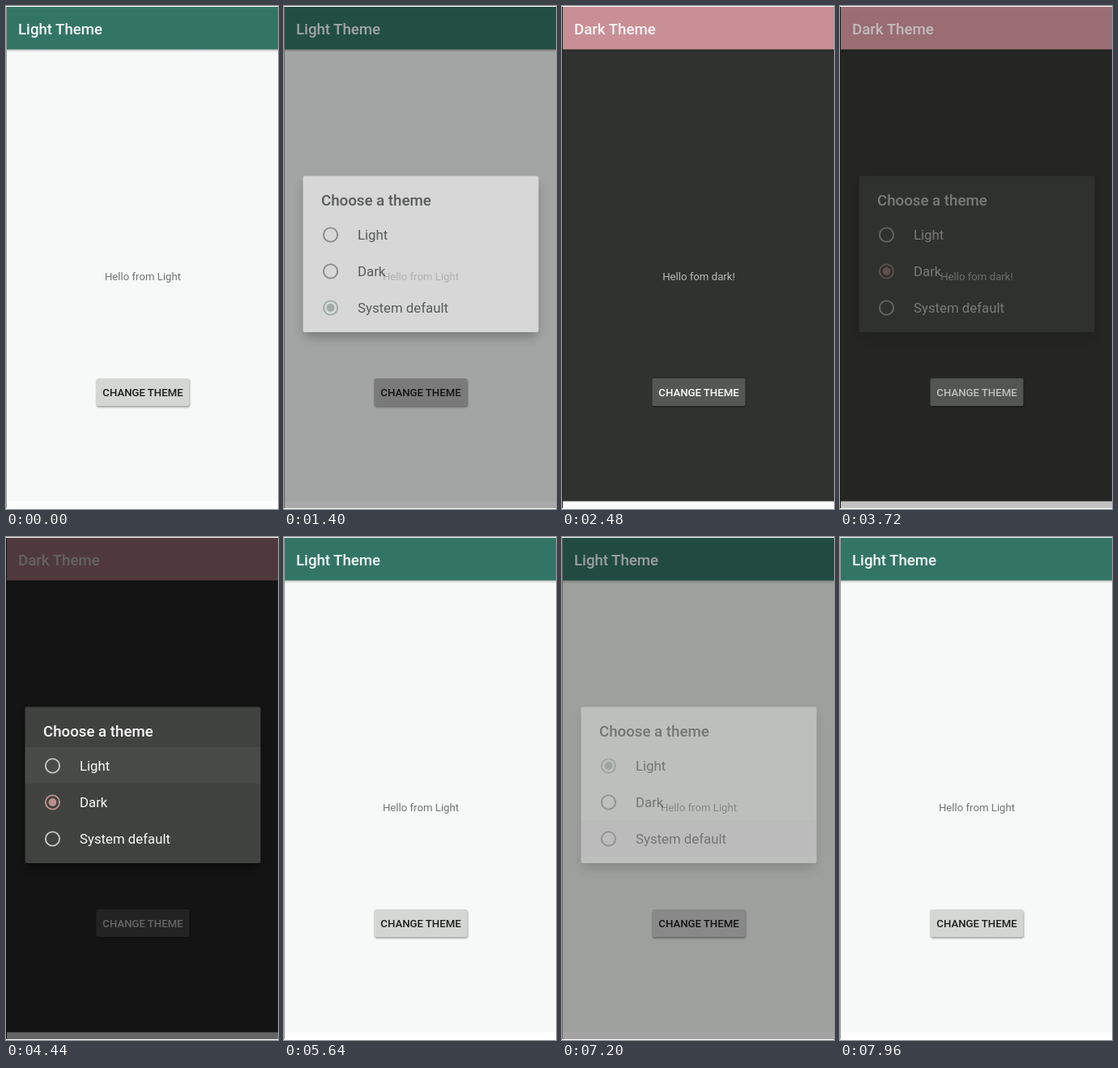
Animation, 336 px wide and 620 px high, one loop 8 s. Source, as an HTML page:

```html
<!DOCTYPE html>
<html lang="en">
<head>
<meta charset="utf-8">
<title>Theme switcher</title>
<style>
html, body { margin: 0; width: 100%; height: 100%; overflow: hidden; background: #fff; }
svg { display: block; width: 336px; height: 620px; font-family: Roboto, sans-serif; }
.light {
  --bar: #337565; --page: #f6f9f7; --title: #f4f8f6; --hello: #717472;
  --button: #d4d6d4; --label: #1b1e1c; --panel: #fefffe; --text: #1f2220;
  --ring: #747775; --accent: #9dada6; --edge: #9a9d9b; --press: #000;
}
.dark {
  --bar: #c98f96; --page: #30322f; --title: #fbf4f4; --hello: #b9bbb8;
  --button: #555755; --label: #fafbfa; --panel: #404240; --text: #f8f9f8;
  --ring: #c6c8c6; --accent: #bd8f8a; --edge: #222422; --press: #fff;
}
.medium { font-weight: 500; }
.option { font-size: 16.8px; fill: var(--text); }
.ring { fill: none; stroke-width: 1.9; }
</style>
</head>
<body>
<svg id="app" class="light" viewBox="0 0 336 620">
  <defs>
    <linearGradient id="fade" x2="0" y2="1">
      <stop stop-opacity=".25"/><stop offset="1" stop-opacity="0"/>
    </linearGradient>
    <filter id="soft" x="-20%" y="-20%" width="140%" height="150%"><feGaussianBlur stdDeviation="7"/></filter>
    <filter id="tight" x="-10%" y="-30%" width="120%" height="170%"><feGaussianBlur stdDeviation="1"/></filter>
  </defs>

  <rect width="336" height="620" fill="#fefefe"/>
  <rect y="1" width="336" height="609.5" fill="var(--page)"/>
  <rect y="53" width="336" height="4" fill="url(#fade)"/>
  <rect y="1" width="336" height="52.5" fill="var(--bar)"/>
  <rect y="1" width="1" height="618" fill="var(--edge)" id="edge"/>
  <text class="medium" x="15" y="34.5" font-size="18.67" fill="var(--title)" id="title"></text>
  <text x="169" y="337.5" font-size="13.2" text-anchor="middle" fill="var(--hello)" id="hello"></text>
  <rect x="112" y="461" width="115" height="33.5" rx="2" opacity=".4" filter="url(#tight)"/>
  <rect x="111.5" y="459" width="115" height="34" rx="2" fill="var(--button)"/>
  <rect x="111.5" y="459" width="115" height="34" rx="2" fill="var(--press)" id="tap"/>
  <text class="medium" x="169" y="481" font-size="13.2" text-anchor="middle" fill="var(--label)">CHANGE THEME</text>

  <rect y="1" width="336" height="618" id="dim"/>
  <g id="dialog">
    <rect x="25" y="218" width="288" height="190" rx="3" opacity=".45" filter="url(#soft)"/>
    <rect x="23.5" y="209.5" width="291" height="192.5" rx="2" fill="var(--panel)"/>
    <rect x="23.5" width="291" height="45" fill="var(--press)" id="row"/>
    <text class="medium" x="46" y="246" font-size="18.67" fill="var(--text)">Choose a theme</text>
    <g id="options"></g>
  </g>
</svg>
<script>
const LOOP = 8000, PRESS = 160;
const $ = id => document.getElementById(id);
const clamp = v => Math.max(0, Math.min(1, v));
const ramp = (t, start, length) => clamp((t - start) / length);
const show = (id, opacity) => $(id).setAttribute('opacity', opacity);

const themes = {
  light: { title: 'Light Theme', hello: 'Hello from Light' },
  dark: { title: 'Dark Theme', hello: 'Hello fom dark!' }
};

// Each visit to the dialog: checked option, tapped option, resulting theme
const visits = [
  { open: 1300, close: 2200, checked: 2, tapped: 1, before: 'light', after: 'dark' },
  { open: 3650, close: 4500, checked: 1, tapped: 0, before: 'dark', after: 'light' },
  { open: 6050, close: 7080, checked: 0, tapped: 2, before: 'light', after: 'light' }
];

$('options').innerHTML = ['Light', 'Dark', 'System default'].map((name, i) => {
  const y = 282 + 45 * i;
  return `<circle class="ring" cx="57.5" cy="${y}" r="8.6"/>
    <circle class="dot" cx="57.5" cy="${y}" r="4.9" fill="var(--accent)"/>
    <text class="option" x="91" y="${y + 6.3}">${name}</text>`;
}).join('');
const rings = document.querySelectorAll('.ring');
const dots = document.querySelectorAll('.dot');

function draw(t) {
  const visit = visits.find(v => t < v.close + 500) || visits[2];
  const { open, close, checked, tapped } = visit;
  const theme = t < close + 160 ? visit.before : visit.after;

  $('app').setAttribute('class', theme);
  $('title').textContent = themes[theme].title;
  $('hello').textContent = themes[theme].hello;

  const entered = ramp(t, open, 180);
  show('tap', 0.14 * ramp(t, open - PRESS, 100) * (1 - ramp(t, open + 100, 200)));
  show('dim', 0.6 * entered * (1 - ramp(t, close, 240) ** 1.35));
  show('dialog', entered * (1 - ramp(t, close, 180)));
  show('row', 0.045 * ramp(t, close - PRESS, 100));
  $('row').setAttribute('y', 259 + 45 * tapped);

  rings.forEach((ring, i) => {
    ring.style.stroke = i === checked ? 'var(--accent)' : 'var(--ring)';
    dots[i].style.display = i === checked ? '' : 'none';
  });
}

function tick() {
  draw(performance.now() % LOOP);
  requestAnimationFrame(tick);
}
tick();
</script>
</body>
</html>
```
